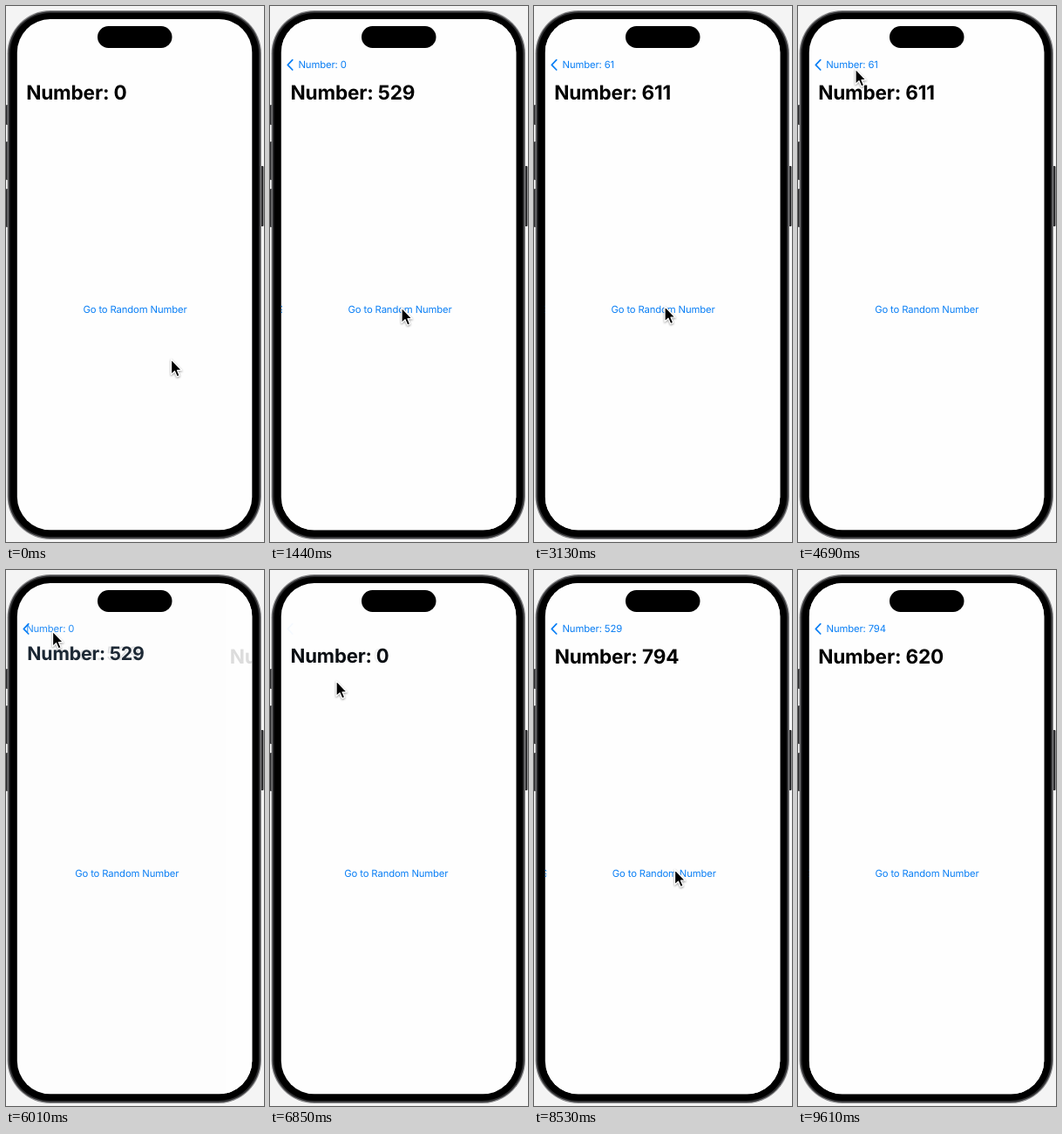
Animation of 296 by 613 pixels, one loop 9.63 s. Source, as an HTML page:

```html
<!DOCTYPE html>
<html lang="en">
<head>
<meta charset="utf-8">
<title>Random number navigation</title>
<style>
  html, body { margin: 0; width: 100%; height: 100%; overflow: hidden; background: #f4f4f4; }
  svg { display: block; width: 296px; height: 613px; }
  text {
    font-family: Inter, "Liberation Sans", sans-serif;
    font-size: 11.3px;
    letter-spacing: -0.012em;
    fill: #0a7ff5;
    text-rendering: geometricPrecision;
  }
  .big { font-weight: 700; font-size: 22.6px; letter-spacing: -0.008em; fill: #000; }
  .mid { text-anchor: middle; }
  #cursor { filter: drop-shadow(0 1px 1px rgba(0, 0, 0, 0.4)); }
</style>
</head>
<body>
<svg viewBox="0 0 296 613">
  <defs>
    <clipPath id="screen"><rect x="12.8" y="15" width="269.5" height="584.3" rx="38"/></clipPath>
  </defs>

  <!-- phone body -->
  <g fill="#2b2b2d">
    <rect x="0" y="113" width="5" height="23" rx="1"/>
    <rect x="0" y="155" width="5" height="44" rx="1"/>
    <rect x="0" y="209" width="5" height="44" rx="1"/>
    <rect x="290" y="183" width="5.5" height="69" rx="1"/>
  </g>
  <rect x="1.5" y="5" width="291.5" height="605" rx="49.5" fill="#8a8a8c"/>
  <rect x="2.7" y="6.2" width="289.1" height="602.6" rx="48.3" fill="#2e2e30"/>
  <rect x="4.5" y="8" width="285.5" height="599" rx="46.5" fill="#000"/>

  <g clip-path="url(#screen)">
    <rect x="12" y="15" width="272" height="585" fill="#fefefe"/>
    <g id="lowPage"><text class="mid" x="148" y="351.3">Go to Random Number</text></g>
    <rect id="dim" x="12" y="15" width="272" height="585"/>
    <g id="highPage">
      <rect x="13" y="15" width="270" height="585" fill="#fefefe"/>
      <text class="mid" x="148" y="351.3">Go to Random Number</text>
    </g>
    <path id="chevron" d="M25.8 61.6 L20.3 67.3 L25.8 73" fill="none" stroke="#0a7ff5"
      stroke-width="1.7" stroke-linecap="round" stroke-linejoin="round"/>
    <text id="oldBack" y="71.2"></text>
    <text id="morphThin"></text>
    <text id="morphBold" class="big"></text>
    <text id="highTitle" class="big" y="107"></text>
  </g>
  <rect x="105" y="23" width="85.5" height="25" rx="12.5" fill="#000"/>

  <path id="cursor" d="M0 0 V17.4 L4 13.8 L6.7 20 L9.7 18.7 L7.1 12.7 H12.2 Z"
    fill="#000" stroke="#fff" stroke-width="1.3" stroke-linejoin="round"/>
</svg>

<script>
const LOOP = 9630, STEP = 120, WIDTH = 270, SPEED = 18;
const ids = ['lowPage', 'dim', 'highPage', 'chevron', 'oldBack', 'morphThin', 'morphBold', 'highTitle', 'cursor'];
const el = Object.fromEntries(ids.map(id => [id, document.getElementById(id)]));

const first = [0, 529, 61, 611, 738];
const second = [0, 529, 794, 620];

// start time, direction, depth of the upper page, stack of numbers
const moves = [
  [-9000, -1, 1, first],
  [1013, 1, 1, first], [1655, 1, 2, first], [2460, 1, 3, first], [3425, 1, 4, first],
  [4240, -1, 4, first], [5010, -1, 3, first], [5793, -1, 2, first], [6560, -1, 1, first],
  [7445, 1, 1, second], [8105, 1, 2, second], [8820, 1, 3, second]
];

// time, x, y of the pointer tip
const path = [
  [0, 189.5, 404], [260, 189.5, 404], [720, 160.5, 343.5], [960, 160.5, 343.5],
  [1440, 151, 345], [2280, 150, 343.5], [3780, 150, 343.5], [4230, 66, 72],
  [4800, 66, 72], [6000, 53.5, 70], [6640, 53.5, 70], [7320, 161.5, 342.5], [LOOP, 161.5, 342.5]
];

const mix = (a, b, k) => a + (b - a) * k;
const smooth = k => k * k * (3 - 2 * k);
const set = (node, attrs) => { for (const k in attrs) node.setAttribute(k, attrs[k]); };
const label = n => 'Number: ' + n;

// what is left of a critically damped spring after some seconds
function rest(seconds) {
  const x = SPEED * seconds, left = (1 + x) * Math.exp(-x);
  return left < 0.002 ? 0 : left;
}

function drawPages(t) {
  const [at, dir, depth, stack] = moves.filter(m => m[0] <= t).pop();
  const left = rest((t - at) / 1000);
  const shown = dir > 0 ? 1 - left : left;
  const away = 1 - shown;

  set(el.highPage, { transform: `translate(${WIDTH * away} 0)` });
  set(el.lowPage, { transform: `translate(${-0.3 * WIDTH * shown} 0)` });
  set(el.dim, { opacity: 0.04 * shown });

  // the large title settles a little ahead of its page
  const titleAway = away ** 1.2;
  el.highTitle.textContent = label(stack[depth]);
  set(el.highTitle, { x: 23.2 + WIDTH * titleAway, opacity: 1 - titleAway });

  // the lower title shrinks into the back label
  const place = {
    x: mix(32.5, 23.2, away),
    y: mix(71.2, 107, away),
    style: `font-size:${mix(11.3, 22.6, away)}px;fill:rgb(${10 * shown},${127 * shown},${245 * shown})`
  };
  el.morphThin.textContent = el.morphBold.textContent = label(stack[depth - 1]);
  set(el.morphThin, { ...place, opacity: shown });
  set(el.morphBold, { ...place, opacity: away });

  const nested = depth > 1;
  el.oldBack.textContent = nested ? label(stack[depth - 2]) : '';
  set(el.oldBack, { x: 32.5 - 82 * shown, opacity: away });
  set(el.chevron, { opacity: nested ? 1 : shown });
}

function drawCursor(t) {
  const i = path.findIndex(p => p[0] > t);
  const [a, b] = [path[i - 1], path[i]];
  const k = smooth((t - a[0]) / (b[0] - a[0]));
  set(el.cursor, {
    transform: `translate(${mix(a[1], b[1], k)} ${mix(a[2], b[2], k)})`,
    visibility: t >= 9600 ? 'hidden' : 'visible'
  });
}

function frame() {
  const t = Math.floor(performance.now() % LOOP / STEP) * STEP;
  drawPages(t);
  drawCursor(t);
  requestAnimationFrame(frame);
}
frame();
</script>
</body>
</html>
```
